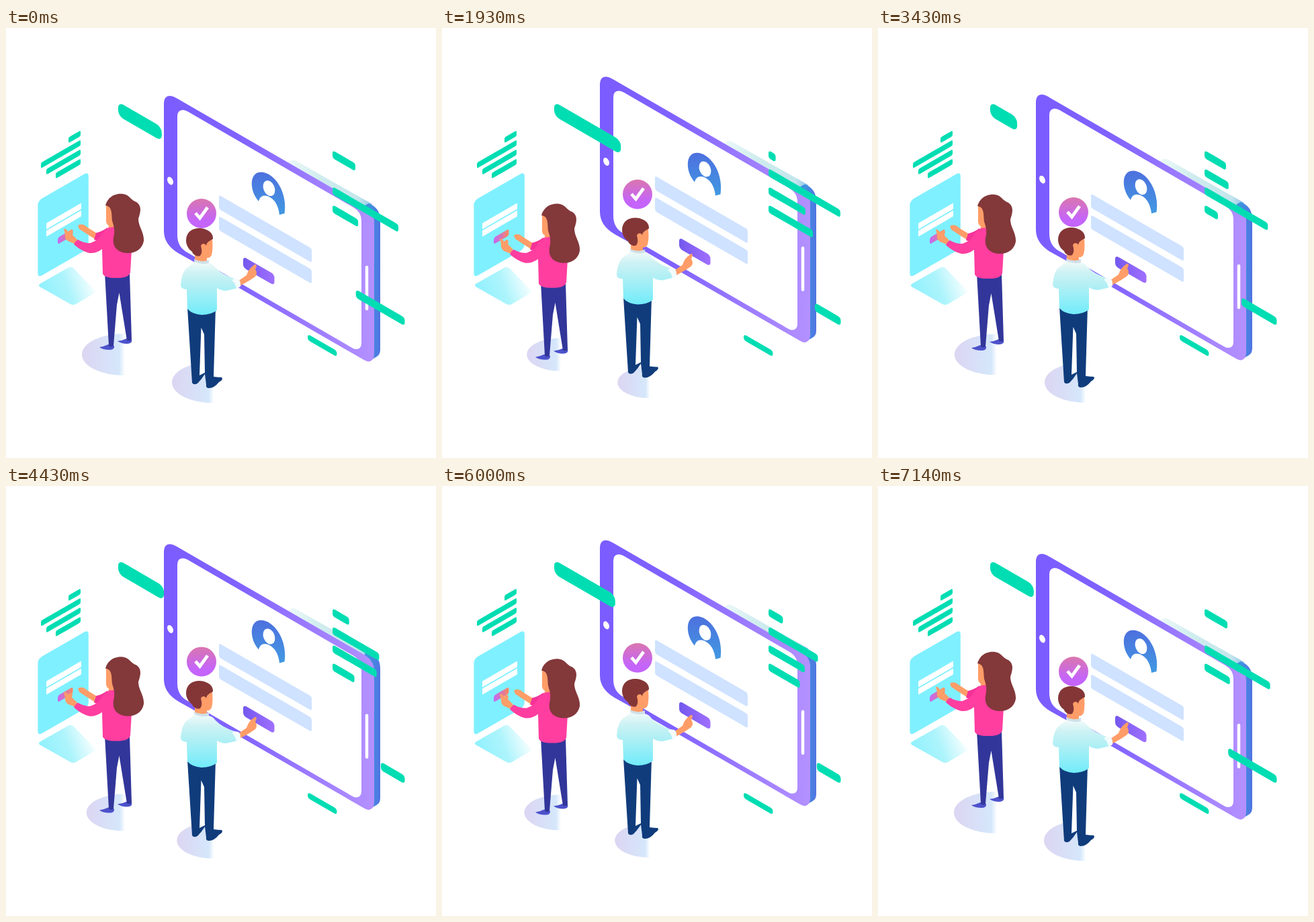
Animation, 640 px wide and 640 px high, one loop 7210 ms. Source, as an HTML page:

```html
<!DOCTYPE html>
<html lang="en">
<head>
<meta charset="utf-8">
<title>Isometric sign-in</title>
<style>
  html, body { margin: 0; width: 100%; height: 100%; overflow: hidden; background: #fff; }
  svg { display: block; width: 100%; height: 100%; }
</style>
</head>
<body>
<svg id="stage" viewBox="0 0 640 640">
  <defs>
    <linearGradient id="shade">
      <stop offset="0" stop-color="#dcd5f2"/>
      <stop offset=".44" stop-color="#d5e7fb"/>
      <stop offset=".51" stop-color="#d5e7fb" stop-opacity="0"/>
    </linearGradient>
    <linearGradient id="frame">
      <stop offset="0" stop-color="#7b5cff"/>
      <stop offset=".35" stop-color="#8062ff"/>
      <stop offset="1" stop-color="#b491ff"/>
    </linearGradient>
    <linearGradient id="rim" gradientUnits="userSpaceOnUse" x1="418" x2="545">
      <stop offset="0" stop-color="#d3efee" stop-opacity=".4"/>
      <stop offset=".4" stop-color="#cfecee"/>
      <stop offset=".85" stop-color="#c3e6ec"/>
      <stop offset="1" stop-color="#8fc3ea"/>
    </linearGradient>
    <linearGradient id="side" gradientUnits="userSpaceOnUse" x1="540" x2="558">
      <stop offset="0" stop-color="#3f93dd"/>
      <stop offset="1" stop-color="#5272e4"/>
    </linearGradient>
    <linearGradient id="avatar" x2="0" y2="1">
      <stop offset="0" stop-color="#4d70de"/>
      <stop offset="1" stop-color="#4199e2"/>
    </linearGradient>
    <linearGradient id="badge" x2="0" y2="1">
      <stop offset="0" stop-color="#da76ae"/>
      <stop offset=".75" stop-color="#c464fb"/>
    </linearGradient>
    <linearGradient id="button">
      <stop offset="0" stop-color="#7458ee"/>
      <stop offset="1" stop-color="#a070ff"/>
    </linearGradient>
    <linearGradient id="chip">
      <stop offset="0" stop-color="#c568f7"/>
      <stop offset=".5" stop-color="#d574b4"/>
      <stop offset="1" stop-color="#ff8a5a"/>
    </linearGradient>
    <linearGradient id="base" x1="0" y1=".65" x2="1" y2=".4">
      <stop offset="0" stop-color="#8df1fe"/>
      <stop offset=".5" stop-color="#adf4fc"/>
      <stop offset="1" stop-color="#fff"/>
    </linearGradient>
    <linearGradient id="shirt" gradientUnits="userSpaceOnUse" x1="0" x2="0" y1="350" y2="427">
      <stop offset="0" stop-color="#eef9f9"/>
      <stop offset=".2" stop-color="#cdf2f4"/>
      <stop offset=".5" stop-color="#aceff5"/>
      <stop offset="1" stop-color="#71ecfa"/>
    </linearGradient>
  </defs>

  <g id="panel">
    <path fill="url(#base)" d="M50 381 L92 357 Q97 354 101 358 L133 391 Q134 393 131 395 L104 411 Q100 413 96 411 L50 385 Q48 383 50 381Z"/>
  </g>

  <g id="phone">
    <path fill="url(#rim)" d="M419 201 L425 197 Q428 196 432 198 L545 262 L540 272Z"/>
    <path fill="url(#side)" d="M534 264 L540 261 Q557 268 557 286 V479 Q557 486 552 489 L540 496Z"/>
    <path fill="url(#frame)" d="M235 113 Q235 101 244 101 Q248 101 253 104 L532 265 Q548 274 548 289 V484 Q548 496 539 496.500 Q536 496 531 493 L276 346 L258 336 Q235 323 235 302Z"/>
    <path fill="#fff" d="M255 132 Q255 122 263 122 Q266 122 270 124 L517 267 Q529 274 529 287 V469 Q529 478 521 478 Q518 478 515 476 L280 340 L268 333 Q255 325 255 308Z"/>
    <ellipse cx="244.500" cy="227.500" rx="4" ry="6.300" transform="rotate(-25 244.500 227.500)" fill="#fff"/>
    <path d="M537 356 V418" stroke="#fff" stroke-width="4.500" stroke-linecap="round"/>
    <path fill="url(#avatar)" d="M376 258 C368 248 365 238 366 228 C368 213 381 211 393 219 C408 229 418 252 414.500 276 L407 278 C406 268 402 257 393 252 C384 247 378 250 376 258Z"/>
    <ellipse cx="391.500" cy="238.500" rx="8.300" ry="12" transform="rotate(-22 391.500 238.500)" fill="#fff"/>
    <circle cx="291" cy="276" r="22" fill="url(#badge)"/>
    <path d="M282 275.500 L288.500 283 L300 267" fill="none" stroke="#fff" stroke-width="4.800"/>
  </g>

  <ellipse id="shadeA" cx="176" cy="486" rx="63.300" ry="31.200" fill="url(#shade)"/>
  <ellipse id="shadeB" cx="308.500" cy="527.500" rx="61.800" ry="30.800" fill="url(#shade)"/>

  <g id="woman">
    <path fill="#4c52cb" d="M139 475 Q146 474 152 471 L161 473 Q162 479 154 479 Q144 479 139 475Z M166 466 Q174 465 180 462 L187 463 Q189 470 180 470 Q172 470 166 466Z"/>
    <path fill="#32369a" d="M147 364 L184 364 L187 464 Q184 467 180 465 L168.500 394 L165 412 L160 473 Q156 476 153 473Z"/>
    <path fill="#ff9d68" d="M107 294 Q110 291 116 293 L123 298 L136 306 L132 314 L118 305 L109 299Z"/>
    <path fill="#f53198" d="M134 305 Q143 303 151 297 L155 312 L143 319 L131 315Z"/>
    <path fill="#ff9d68" d="M149 262 L158 264 L163 298 L152 301 L153 294 Q148 292 149 282Z"/>
    <path fill="#ff9d68" d="M86 299 Q89 298 92 303 L97 300 Q100 302 98 307 L106 315 L102 321 L92 317 Q87 313 88 307Z"/>
    <path fill="#ff3ea0" d="M153 297 L162 296 Q185 300 187 330 L185 364 Q182 373 162 372 Q147 372 144 366 L143 329 Q134 336 124 335 Q112 332 101 322 Q103 317 107 315 Q117 321 126 320 Q140 315 144 304Z"/>
    <path fill="#83383a" d="M148 264 C152 250 164 246 174 247 C184 248 185 256 194 259 C203 265 200 275 197 284 C197 296 206 304 205 317 C203 329 192 336 180 335 C165 334 158 325 160 312 C163 300 160 294 158 287 C157 274 158 266 148 264Z"/>
  </g>

  <g id="man">
    <path fill="#103c7c" d="M270 416 L312 416 L309 519 Q316 520 321 520 Q324 523 317 527 Q310 536 302 536 Q297 536 298 531 L296 515 Q291 523 285 529 Q279 532 277 528Z"/>
    <path fill="#fff" d="M290.500 446 L295 456 L296 513 L288 517Z"/>
    <path fill="#ff9d68" d="M345 377 L358 368 Q361 358 369 353 Q372 350 373 354 L371 359 Q375 365 371 370 L362 376 L348 384Z"/>
    <path fill="#ff9d68" d="M281 336 L298 312 L306 308 Q309 326 306 338 Q303 343 299 342 L299 351 L281 350Z"/>
    <path fill="#cfe0e8" d="M280 344 Q291 350 302 345 L302 353 L281 354Z"/>
    <path fill="url(#shirt)" d="M281 348 Q291 353 302 350 Q308 351 312 357 Q322 367 340 373 L348 376 Q350 382 345 387 L328 391 Q320 391 314 387 L314 420 Q305 427 291 427 Q277 426 270 418 L269 389 Q260 389 260 382 Q261 368 267 359Z"/>
    <path fill="#f4fcfd" d="M339 373 L346 374 Q350 379 349 385 L343 388 Q341 378 336 376Z"/>
    <path fill="#843637" d="M268 316 C268 304 277 298 287 298 C298 298 309 304 308 314 C303 317 299 318 298 324 C296 319 290 321 291 327 C292 333 291 336 289 339 C284 341 278 337 277 333 C271 329 268 322 268 316Z"/>
    <path fill="#ff9d68" d="M290 324 Q292 319 297 323 L297 331 L292 333Z"/>
  </g>
  <g id="bars"></g>
</svg>
<script>
  const LOOP = 7210, FRAMES = 101, TAN = Math.tan(Math.PI / 6);
  const GREEN = '#00ddb3';
  const el = id => document.getElementById(id);

  // Rounded rectangle sheared by 30 degrees; (x, y) is its upper left corner.
  function slab(parent, x, y, w, h, r, fill, tilt = 30) {
    const rect = document.createElementNS('http://www.w3.org/2000/svg', 'rect');
    const attrs = { width: w, height: h, rx: r, fill, transform: `translate(${x} ${y}) skewY(${tilt})` };
    for (const name in attrs) rect.setAttribute(name, attrs[name]);
    el(parent).append(rect);
    return rect;
  }

  slab('panel', 47.4, 257.3, 75.4, 114.5, 6, '#7ff0ff', -30);
  slab('panel', 60, 290.5, 52, 9, 1, '#fff', -30);
  slab('panel', 60, 301.5, 52, 9, 1, '#fff', -30);
  slab('panel', 77, 312, 22.5, 10, 3, 'url(#chip)', -30);

  slab('phone', 317, 248.5, 138, 21, 3, '#cfe2ff');
  slab('phone', 317, 280, 138, 21, 3, '#cfe2ff');
  slab('phone', 353, 340, 46.5, 16.5, 5, 'url(#button)');

  for (const [x, right] of [[93, 152.5], [52, 166.5], [60, 180.5], [74, 194.5]])
    slab('bars', x, right + (111 - x) * TAN, 111 - x, 8.5, 2.2, GREEN, -30);
  slab('bars', 449, 455.5, 43.5, 9, 4, GREEN);

  // Right edge of each growing bar at the four quarters of the loop.
  const growing = [
    { x: 167, y: 110, h: 21, r: 8, ends: [231, 272.5, 201.5, 272] },
    { x: 486, y: 182, h: 11.6, r: 3.6, ends: [520.5, 494.3, 520, 500.5] },
    { x: 486, y: 209, h: 11.6, r: 3.6, ends: [483, 600.5, 515, 600] },
    { x: 486, y: 236, h: 11.6, r: 3.6, ends: [585, 536.7, 584, 516] },
    { x: 486, y: 263, h: 11.6, r: 3.6, ends: [523.5, 557, 501.5, 537.5] }
  ];
  for (const b of growing) b.rect = slab('bars', b.x, b.y, 0, b.h, b.r, GREEN);

  const retracting = slab('bars', 0, 0, 0, 12.5, 4.5, GREEN);
  const retractStarts = [520, 556.3, 539.7, 578];

  function quarterly(values, phase) {
    const i = Math.floor(phase * 4);
    return values[i] + (values[(i + 1) % 4] - values[i]) * (phase * 4 - i);
  }

  const shift = (id, y) => el(id).setAttribute('transform', `translate(0 ${y})`);

  function squash(id, x, y, s) {
    el(id).setAttribute('transform', `translate(${x} ${y}) scale(${s}) translate(${-x} ${-y})`);
  }

  function draw() {
    const ticks = Math.floor(performance.now() % LOOP / 10) + 0.5;
    const phase = (Math.floor(ticks * 10 / LOOP * FRAMES) + 0.5) / FRAMES;
    const lift = quarterly([0, 1, 0, 1], phase);
    const rise = lift - 0.02;
    shift('phone', -32 * rise);
    shift('woman', 16.5 * rise);
    shift('man', -17.5 * rise);
    squash('shadeA', 176, 486, 1 - 0.235 * lift);
    squash('shadeB', 308.5, 527.5, 1 - 0.26 * lift);
    for (const b of growing)
      b.rect.setAttribute('width', Math.max(0, quarterly(b.ends, phase) - b.x));
    const start = quarterly(retractStarts, phase), length = 593.5 - start;
    retracting.setAttribute('width', length);
    retracting.setAttribute('transform', `translate(${start} ${431 - length * TAN}) skewY(30)`);
    requestAnimationFrame(draw);
  }
  draw();
</script>
</body>
</html>
```
